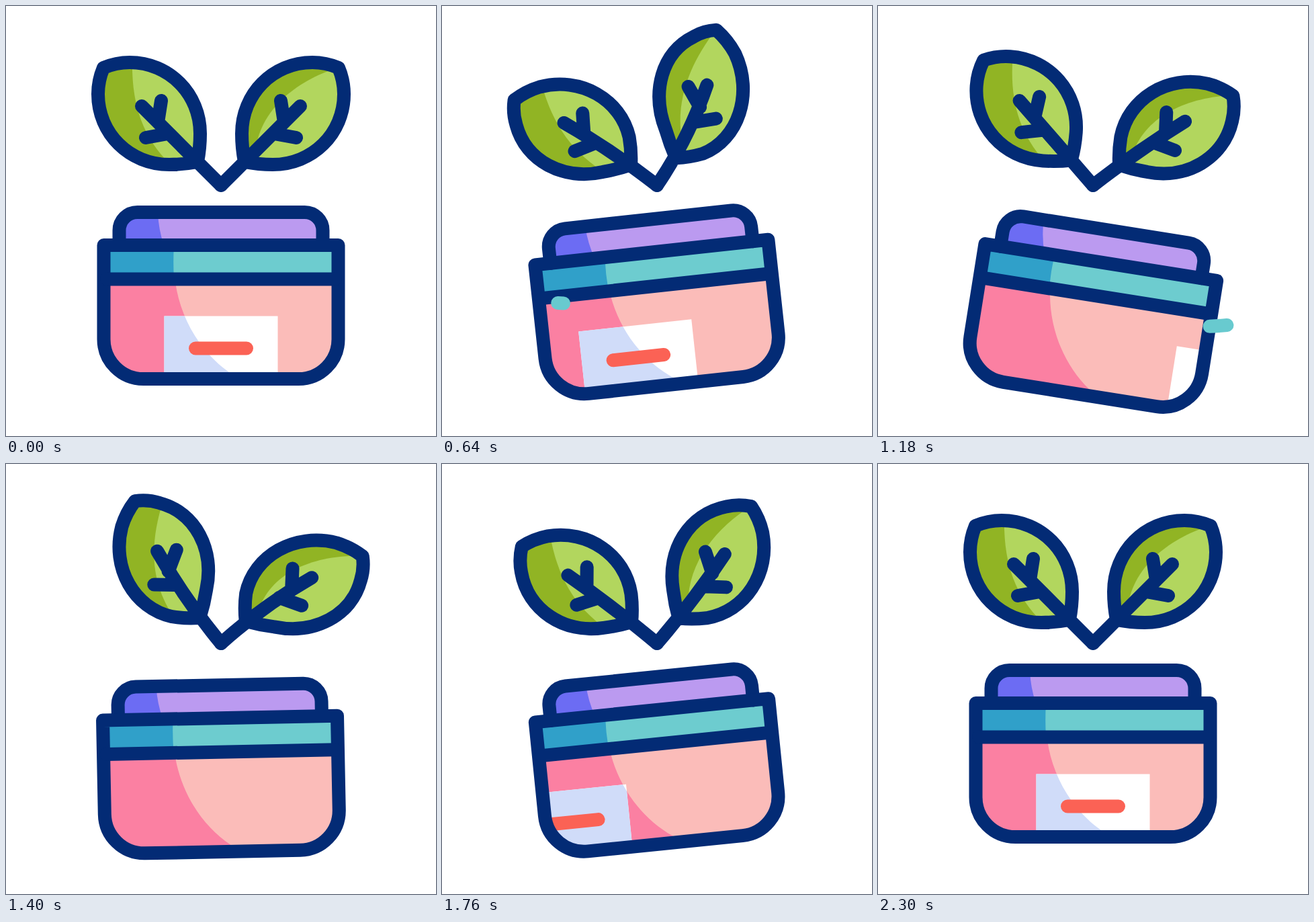
Animation, 640 px wide and 640 px high, one loop 2400 ms. Source, as an HTML page:

```html
<!DOCTYPE html>
<html lang="en">
<head>
<meta charset="utf-8">
<title>Natural cream</title>
<style>
  html, body { margin: 0; width: 100%; height: 100%; overflow: hidden; background: #fff; }
  svg { display: block; width: 100vw; height: 100vh; }
  .line { fill: none; stroke: #032b75; stroke-width: 20; stroke-linecap: round; stroke-linejoin: round; }
  .swoosh { fill: none; stroke: #68cacf; stroke-width: 20; stroke-linecap: round; }
  .dark { fill: #91b424; }
  .light { fill: #b2d65e; }
</style>
</head>
<body>
<svg viewBox="0 0 640 640">
  <defs>
    <path id="lid" d="M168.500 356V334A27 27 0 0 1 195.500 307H444.500A27 27 0 0 1 471.500 334V356"/>
    <path id="pot" d="M145.500 356H494.500V496A59 59 0 0 1 435.500 555H204.500A59 59 0 0 1 145.500 496Z"/>
    <path id="shade" d="M140 406H252.500L253 417C262 470 292 517 332 545L348 560H140Z"/>
    <clipPath id="inLid"><use href="#lid"/></clipPath>
    <clipPath id="inPot"><use href="#pot"/></clipPath>
    <clipPath id="inShade"><use href="#shade"/></clipPath>
    <clipPath id="leftClip"><path/></clipPath>
    <clipPath id="rightClip"><path/></clipPath>
  </defs>

  <g id="left" transform="translate(320 267) scale(-1 1)">
    <path class="dark"/>
    <g clip-path="url(#leftClip)"><path class="light"/></g>
    <path class="line"/>
  </g>
  <g id="right" transform="translate(320 267)">
    <path class="dark"/>
    <g clip-path="url(#rightClip)"><path class="light"/></g>
    <path class="line"/>
  </g>

  <g id="jar">
    <g clip-path="url(#inLid)">
      <path fill="#bb9af0" d="M160 300H480V360H160Z"/>
      <path fill="#6c6cf3" d="M160 300H226V307Q227 333 235 356H160Z"/>
    </g>
    <g clip-path="url(#inPot)">
      <path fill="#fbbcb9" d="M140 406H500V560H140Z"/>
      <use href="#shade" fill="#fb80a2"/>
      <path fill="#6dcccf" d="M140 356H500V406H140Z"/>
      <path fill="#30a0c9" d="M140 356H250Q248.500 381 250 406H140Z"/>
      <rect class="label" x="235.500" y="461.500" width="169" height="95" fill="#fff"/>
      <g clip-path="url(#inShade)">
        <rect class="label" x="235.500" y="461.500" width="169" height="95" fill="#d0dcf9"/>
      </g>
      <path class="label" d="M282 509.500H358" stroke="#fb6255" stroke-width="20" stroke-linecap="round"/>
    </g>
    <use href="#lid" class="line"/>
    <use href="#pot" class="line"/>
    <path class="line" d="M150 406.500H490"/>
    <path id="upper" class="swoosh" pathLength="1" d="M173 416C280 433 420 446 520 419"/>
    <path id="lower" class="swoosh" pathLength="1" d="M200 452C270 477 340 494 440 483"/>
  </g>
</svg>
<script>
const LOOP = 2400;
const $ = s => document.querySelector(s);

// Swings from one turning point [time, value] to the next on half cosine waves.
const swing = (...turns) => t => {
  const next = turns.findIndex(p => p[0] > t);
  if (next < 1) return turns.at(next)[1];
  const [t0, v0] = turns[next - 1], [t1, v1] = turns[next];
  return v0 + (v1 - v0) * (1 - Math.cos(Math.PI * (t - t0) / (t1 - t0))) / 2;
};
const ease = (from, to) => swing([from, 0], [to, 1]);

// Leaf shapes relative to the foot of the stem, growing up to the right.
const OUTLINE = 'M35 -35Q31 -56 31 -77C31 -136 77 -183 136 -183Q156 -183 175 -175'
  + 'Q183 -156 183 -136C183 -77 136 -31 77 -31Q56 -31 35 -35Z';
const VEINS = 'M0 0C39.3 -39.3 78.7 -78.7 118 -118M89 -126L94 -94M112 -71L79 -77';
const TIP = 248, VEIN = 167;

// Turns are degrees counter-clockwise at the tip.
const leaves = [
  {
    id: 'left', side: -1,
    light: 'M132 -190C134 -117 115 -67 68 -24L0 -20L0 -220Z',
    turn: swing([200, 0], [820, 17.5], [1405, -13.9], [1825, 10.8], [2300, 0])
  },
  {
    id: 'right', side: 1,
    light: 'M176 -176C110 -155 52 -110 50 -38L50 0L120 0L230 -60L230 -176Z',
    turn: swing([200, 0], [715, 25.4], [1300, -16.5], [1760, 10.5], [2300, 0])
  }
];

const tilt = swing([200, 0], [570, -6.9], [1110, 9.9], [1600, -7.2], [2150, 0]);
const drop = swing([200, 0], [1190, 24.5], [2230, 0]);

// The label winds up, leaves to the right and coasts back in from the left.
const leave = swing([200, 0], [560, -43], [1440, 280]);
const arrive = t => -232 * (Math.max(0, 2300 - t) / 720) ** 1.9;

const swooshes = [
  { el: $('#upper'), head: ease(600, 1000), tail: ease(740, 1275) },
  { el: $('#lower'), head: ease(740, 1095), tail: ease(800, 1170) }
];

// Turns each point of a path by an angle that depends on its distance from the foot.
function bend(d, angle) {
  return d.replace(/(-?[\d.]+) (-?[\d.]+)/g, (_, x, y) => {
    const a = angle(Math.hypot(x, y)) * Math.PI / 180;
    const c = Math.cos(a), s = Math.sin(a);
    return (x * c + y * s).toFixed(2) + ' ' + (y * c - x * s).toFixed(2);
  });
}

function drawLeaf({ id, side, light, turn }, t) {
  // The vein moves less than the tip and a little ahead of it.
  const vein = 0.75 * turn(t + 20);
  const rise = (turn(t) - vein) / (TIP - VEIN);
  const angle = r => side * (vein + rise * (r - VEIN));
  const outline = bend(OUTLINE, angle);
  const set = (selector, d) => $(selector).setAttribute('d', d);
  set(`#${id}Clip path`, outline);
  set(`#${id} .dark`, outline);
  set(`#${id} .light`, bend(light, angle));
  set(`#${id} .line`, outline + bend(VEINS, angle));
}

function drawSwoosh({ el, head, tail }, t) {
  const from = tail(t), length = head(t) - from;
  el.style.display = length > 0.001 ? '' : 'none';
  el.setAttribute('stroke-dasharray', `${Math.max(0, length)} 2`);
  el.setAttribute('stroke-dashoffset', -from);
}

const labels = document.querySelectorAll('.label');

function draw(t) {
  leaves.forEach(leaf => drawLeaf(leaf, t));
  $('#jar').setAttribute('transform', `translate(0 ${drop(t)}) rotate(${tilt(t)} 320 431)`);
  const shift = t < 1400 ? leave(t) : arrive(t);
  labels.forEach(el => el.setAttribute('transform', `translate(${shift} 0)`));
  swooshes.forEach(s => drawSwoosh(s, t));
}

const start = performance.now();
function frame() {
  // Rest at both ends of the loop, before and after the motion.
  const t = (performance.now() - start) % LOOP;
  draw(t);
  requestAnimationFrame(frame);
}
frame();
</script>
</body>
</html>
```
